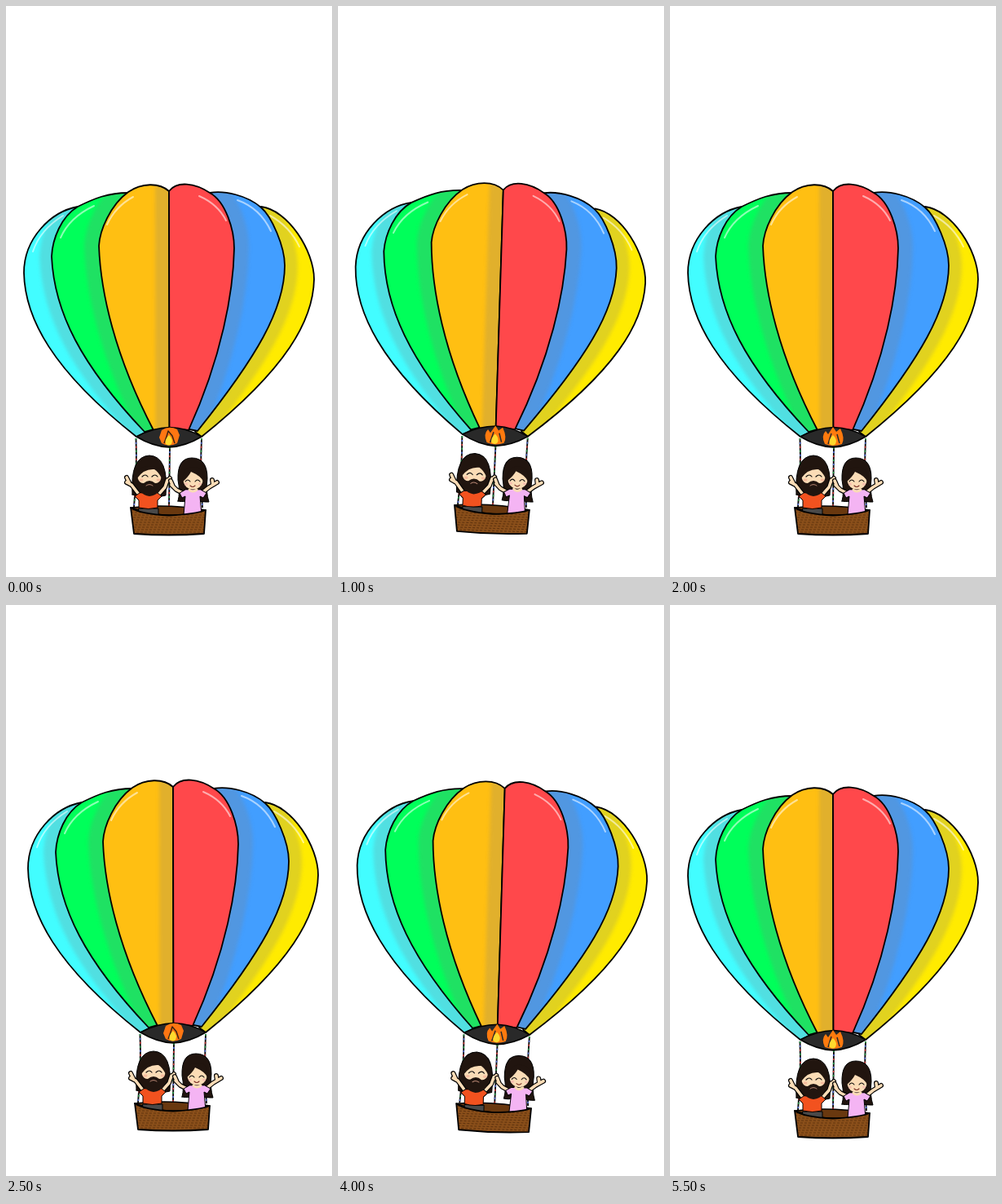
These frames come from a looping animation (400 by 700 pixels, 6 s). An HTML page with a canvas:

```html
<!DOCTYPE html>
<html lang="en">
<head>
<meta charset="utf-8">
<title>Balloon ride</title>
<style>
html, body { margin: 0; width: 100%; height: 100%; overflow: hidden; background: #fff; }
canvas { display: block; }
</style>
</head>
<body>
<canvas width="400" height="700"></canvas>
<script>
const ctx = document.querySelector('canvas').getContext('2d');
const STEP = 500;

// Drift x, drift y, tilt in degrees, held for one step each
const poses = [
  [0, 0, 0], [4, -2, 0], [-2, -1.5, 1.9], [2, 3, -1.43],
  [0, 0, 0], [5, -4, 0], [0, 0, 0.6], [0, 0, 0.3],
  [0, -2.2, 1.85], [0, 0, -0.6], [0, 0.5, 0], [0, 5, 0]
];
const pointedFlame = [2, 4, 8, 9, 11];

const edge = {
  cyan: 'M88 246C55 252 22 285 22 327C23 382 56 446 160 528L172 522L120 300Z',
  yellow: 'M313 246C346 250 378 300 378 335C377 385 345 444 240 528L232 522L285 300Z',
  green: 'M150 229C125 229 108 236 88 246C68 258 57 285 56 307C59 375 92 440 170 522L184 518L150 300Z',
  blue: 'M250 229C268 226 296 232 313 247C326 258 342 295 342 318C342 372 307 431 235 521L220 518L250 300Z',
  orange: 'M200 227C188 216 166 217 150 228C128 244 115 275 114 294C116 350 133 428 181 520L200.5 518Z',
  red: 'M200 227C210 214 232 217 250 229C270 240 280 275 280 297C279 350 265 430 224 520L200.5 518Z'
};

// Gore, fill, edge that casts the shade, shade width, highlight
const gores = [
  ['cyan', '#42fdff', edge.green, 30, 'M33 301Q42 274 70 257'],
  ['yellow', '#ffeb00', edge.blue, 32, 'M324 257Q348 270 360 295'],
  ['green', '#00ff5a', edge.orange, 36, 'M67 284Q78 259 108 245'],
  ['blue', '#429eff', edge.red, 36, 'M284 238Q312 248 325 276'],
  ['orange', '#ffbf12', 'M200 220L200.5 520', 34, 'M124 268Q134 246 156 234'],
  ['red', '#ff484b', '', 0, 'M237 233Q260 243 270 263']
];

function line(d, color = '#000', width = 1.5, dash = [], offset = 0) {
  ctx.strokeStyle = color;
  ctx.lineWidth = width;
  ctx.setLineDash(dash);
  ctx.lineDashOffset = offset;
  ctx.stroke(new Path2D(d));
  ctx.setLineDash([]);
}

function shape(d, fill, width = 1.5) {
  ctx.fillStyle = fill;
  ctx.fill(new Path2D(d));
  if (width) line(d, '#000', width);
}

function oval(x, y, rx, ry, fill) {
  ctx.fillStyle = fill;
  ctx.beginPath();
  ctx.ellipse(x, y, rx, ry, 0, 0, 7);
  ctx.fill();
}

function clipped(d, paint) {
  ctx.save();
  ctx.clip(new Path2D(d));
  paint();
  ctx.restore();
}

function limb(d) {
  line(d, '#000', 6);
  line(d, '#fbdcb6', 3.6);
}

function envelope() {
  for (const [name, fill, caster, width, shine] of gores) {
    shape(edge[name], fill, 0);
    clipped(edge[name], () => {
      ctx.filter = 'blur(2px)';
      if (width) line(caster, 'rgba(128,128,128,.24)', width);
      ctx.filter = 'none';
      line(shine, 'rgba(255,255,255,.55)', 2);
    });
    line(edge[name], '#000', 1.8);
  }
}

function burner(pointed) {
  shape('M160 528Q180 517 201 516.5Q222 517 240 528Q220 540 200 541Q180 540 160 528Z', '#292929');
  if (pointed) {
    shape('M190 537Q185 527 191 521L194 525L200 516L204 522L209 518Q215 530 211 537Q200 541 190 537Z', '#ff7a0e', 0);
    line('M194 537L198 524M205 525L208 536', '#292929', 1.5);
  } else {
    shape('M191 536L188 529L191 520Q200 514 210 519L213 526L210 536Q200 541 191 536Z', '#ff7612', 0);
    line('M194 536Q197 529 199 521L204 527L207 536', '#3a2413', 1.5);
  }
  shape('M196 537Q194 532 200 526Q206 532 203 537Q200 540 196 537Z', '#ffd92e', 0);
}

function ropes() {
  for (const d of ['M159.5 530Q161 570 157 614', 'M240 530Q238 570 241 615', 'M201 541L200 613']) {
    line(d, '#111', 1.9);
    ['#24a04a', '#d33a3a', '#5370dd'].forEach((c, i) => line(d, c, 1.6, [2, 13], i * 5));
  }
}

function man() {
  shape('M155 599Q152 552 176 551Q200 552 196 600Q176 606 155 599Z', '#21150f', 1);
  limb('M164 600L154 587L148 584M152 586L148 578');
  limb('M186 600L195 590L198 581M197 584L201 579');
  shape('M163 616H187V625H163Z', '#494949', 1);
  shape('M164 597L158 601L163 606V615Q175 618 186 615V606L191 601L186 597Z', '#f2521f', 1);
  oval(176, 577, 14.5, 11, '#fbdcb6');
  shape('M161 579Q160 564 176 564Q192 564 191 579Q187 571 182 568Q169 567 161 579Z', '#21150f', 0);
  oval(166, 581, 2.5, 1.7, '#f6bd9f');
  oval(187, 581, 2.5, 1.7, '#f6bd9f');
  line('M167 577Q171 573 174 577M179 577Q183 573 186 577', '#111', 1.2);
  shape('M161 581Q164 585 169 585Q176 579 183 585Q188 585 191 581Q192 599 176 601Q161 599 161 581Z', '#21150f', 0);
  line('M172 588Q176 585 180 588', '#b78673', 1);
}

function woman() {
  shape('M211 607Q214 596 211 581Q210 554 228 554Q247 554 247 579Q245 596 249 608Q238 609 229 604Q220 609 211 607Z', '#21150f', 1);
  limb('M219 598L209 593L203 587M205 589L202 582');
  limb('M239 598L249 590L254 587L259 584M254 587L253 581');
  shape('M220 593L213 597L216 603L220 601L218 624H240L238 601L242 603L246 597L239 593Z', '#f4b4f3', 1);
  line('M225 593Q229 597 234 593', '#fbdcb6', 3);
  oval(229.5, 581, 12, 11.5, '#fbdcb6');
  shape('M217 583Q215 565 230 565Q244 565 242 583Q239 576 227 571Q224 577 217 583Z', '#21150f', 0);
  oval(221, 586, 2, 1.5, '#f8bfb0');
  oval(238, 586, 2, 1.5, '#f8bfb0');
  line('M220 583Q223 579 226 583M232 583Q235 579 238 583', '#111', 1.1);
  line('M226 588Q229 591 232 588', '#7a3027', 1.1);
}

function basketBack() {
  shape('M153 615Q200 610 245 618Q200 632 153 615Z', '#69380f');
}

function basketFront() {
  const front = 'M153 615Q165 623 200 624.5Q232 623 245 618L243 647Q200 650 157 647Z';
  shape(front, '#8a4f1a', 0);
  clipped(front, () => {
    for (let y = 618; y < 650; y += 3) line(`M150 ${y}H248`, '#64360f', 1.2, [3, 2], y * 7 % 5);
  });
  line(front, '#000', 1.8);
}

function draw(step) {
  const [x, y, tilt] = poses[step];
  ctx.fillStyle = '#fff';
  ctx.fillRect(0, 0, 400, 700);
  ctx.save();
  ctx.translate(200 + x, 372 + y);
  ctx.rotate(tilt * Math.PI / 180);
  ctx.translate(-200, -372);
  ctx.lineJoin = ctx.lineCap = 'round';
  envelope();
  ctx.lineCap = 'butt';
  ropes();
  burner(pointedFlame.includes(step));
  basketBack();
  ctx.lineCap = 'round';
  man();
  woman();
  ctx.lineCap = 'butt';
  basketFront();
  ctx.restore();
}

let shown = -1;
function tick() {
  const step = Math.floor(performance.now() / STEP) % poses.length;
  if (step !== shown) draw(shown = step);
  requestAnimationFrame(tick);
}
tick();
</script>
</body>
</html>
```
